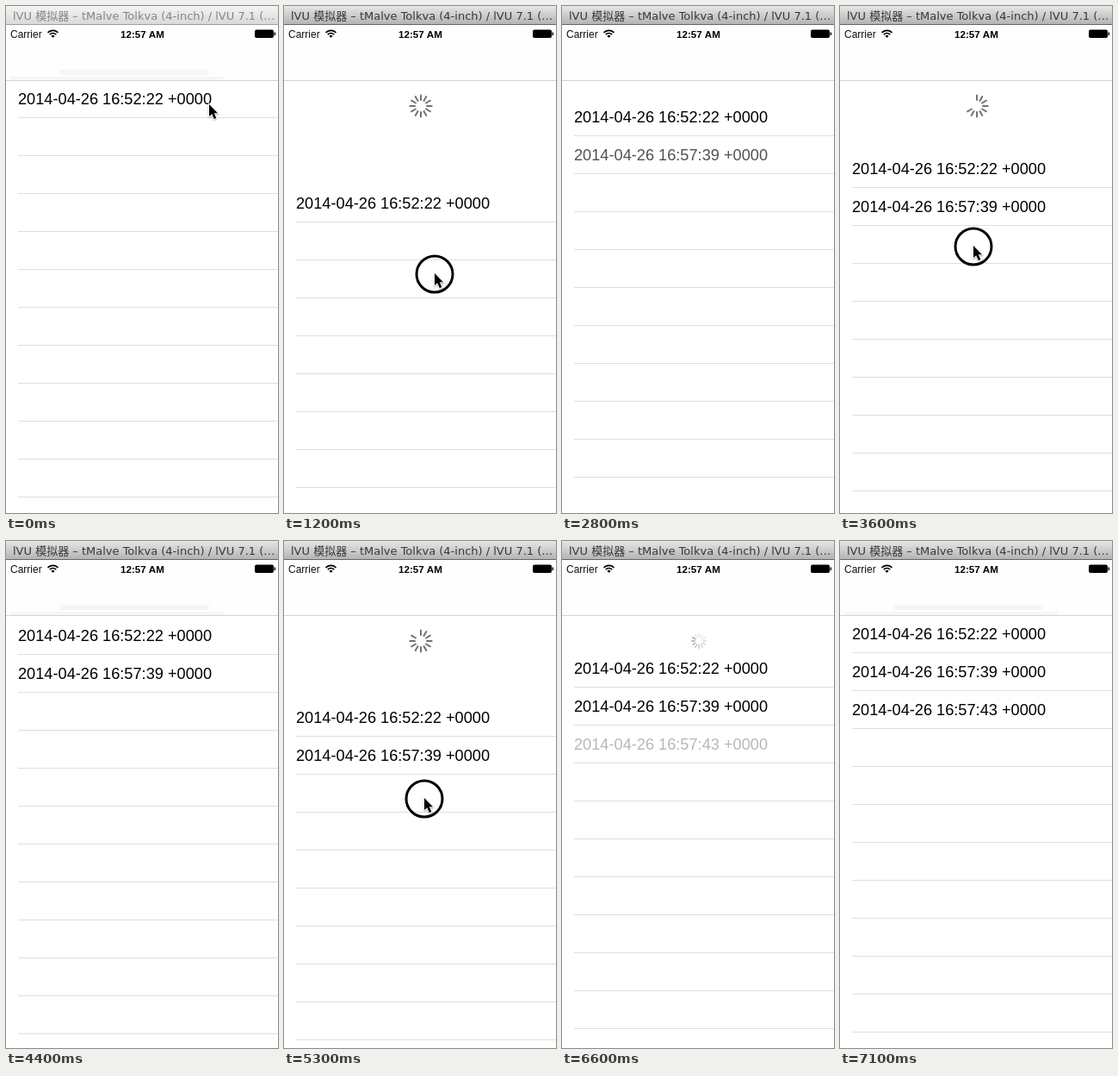
These frames come from a looping animation (316x588 px, 8000 ms). An HTML page with a canvas:

```html
<!DOCTYPE html>
<html lang="zh">
<head>
<meta charset="utf-8">
<title>Pull to refresh</title>
<style>
  html, body { margin: 0; width: 100%; height: 100%; overflow: hidden; background: #fff; }
  canvas { display: block; width: 316px; height: 588px; }
</style>
</head>
<body>
<canvas id="stage"></canvas>
<script>
const W = 316, H = 588, LOOP = 8000;
const NAV_BOTTOM = 86, ROW = 44, SETTLE = 570, REST = 60, DRAG_RATIO = 0.65;

const canvas = document.getElementById('stage');
const ctx = canvas.getContext('2d');
const dpr = window.devicePixelRatio || 1;
canvas.width = W * dpr;
canvas.height = H * dpr;
ctx.scale(dpr, dpr);

// Each pull: finger path as [time, offset], then a release; "done" ends a refresh.
const pulls = [
  { show: 0, path: [[600, 0], [1200, 121], [1500, 128]], done: 2630, from: [192, 125], toX: 175 },
  { show: 3300, path: [[3440, 0], [3600, 81], [3800, 92], [4000, 88]], from: [177, 154], toX: 155 },
  { show: 4650, path: [[4950, 0], [5400, 124], [5600, 130]], done: 6530, from: [172, 150], toX: 160 }
];
for (const p of pulls) {
  p.press = p.path[0][0];
  [p.release, p.peak] = p.path[p.path.length - 1];
}

const rows = [
  ['2014-04-26 16:52:22 +0000', 0],
  ['2014-04-26 16:57:39 +0000', pulls[0].done],
  ['2014-04-26 16:57:43 +0000', pulls[2].done]
];

const clamp = v => Math.max(0, Math.min(1, v));
const mix = (a, b, k) => a + (b - a) * k;
const easeOut = k => 1 - (1 - clamp(k)) ** 3;

function along(path, t) {
  for (let i = 1; i < path.length; i++) {
    const [t0, a] = path[i - 1], [t1, b] = path[i];
    if (t < t1) return mix(a, b, clamp((t - t0) / (t1 - t0)));
  }
  return path[path.length - 1][1];
}

function offsetOf(p, t) {
  if (t < p.release) return along(p.path, t);
  if (p.done && t >= p.done) return mix(REST, 0, easeOut((t - p.done) / SETTLE));
  return mix(p.peak, p.done ? REST : 0, easeOut((t - p.release) / SETTLE));
}

function rect(color, x, y, w, h) {
  ctx.fillStyle = color;
  ctx.fillRect(x, y, w, h);
}

function label(text, x, y, font, color) {
  ctx.font = font;
  ctx.fillStyle = color;
  ctx.fillText(text, x, y);
}

function drawSpinner(p, t, offset) {
  const refreshing = p.done && t >= p.release;
  const ending = p.done && t >= p.done;
  const count = refreshing ? 12 : Math.max(0, Math.min(12, Math.round((offset - 20) / 7)));
  const head = Math.floor(t / 985 * 12) + 2;
  const scale = ending ? offset / REST : 1;
  ctx.save();
  ctx.translate(159, 116);
  ctx.scale(scale, scale);
  ctx.lineWidth = 2;
  ctx.lineCap = 'round';
  ctx.strokeStyle = '#666';
  for (let i = 0; i < count; i++) {
    const age = (((head - i) % 12) + 12) % 12;
    const a = i * Math.PI / 6;
    ctx.globalAlpha = refreshing ? scale * Math.max(0.24, 0.95 - age * 0.085) : 0.92;
    ctx.beginPath();
    ctx.moveTo(Math.sin(a) * 7, -Math.cos(a) * 7);
    ctx.lineTo(Math.sin(a) * 12.6, -Math.cos(a) * 12.6);
    ctx.stroke();
  }
  ctx.restore();
}

function drawTable(t, offset) {
  const top = NAV_BOTTOM + offset;
  rect('#fff', 0, top, W, H - top);
  rows.forEach(([text, since], i) => {
    if (t < since) return;
    ctx.globalAlpha = since ? clamp((t - since) / 250) : 1;
    label(text, 14, top + 28 + i * ROW, '18.2px "Liberation Sans", Arial, sans-serif', '#000');
    ctx.globalAlpha = 1;
  });
  for (let y = top + 43; y < H; y += ROW) rect('#dedee0', 14, y, W - 14, 1);
}

function drawNavBar(offset) {
  rect('#fefefe', 0, 22, W, NAV_BOTTOM - 22);
  if (offset < 5) {
    rect('#f6f6f6', 62, 74, 174, 6);
    rect('#f6f6f6', 5, 82, 248, 4);
  }
  rect('#d3d3d3', 0, NAV_BOTTOM, W, 1);
}

function drawStatusBar() {
  label('Carrier', 5, 36.5, '12px "Liberation Sans", Arial, sans-serif', '#111');
  label('12:57 AM', 133, 36.5, 'bold 11.6px "Liberation Sans", Arial, sans-serif', '#000');

  ctx.strokeStyle = ctx.fillStyle = '#000';
  ctx.lineWidth = 1.7;
  for (const r of [5, 8.2]) {
    ctx.beginPath();
    ctx.arc(54.5, 36.5, r, -Math.PI * 0.76, -Math.PI * 0.24);
    ctx.stroke();
  }
  ctx.beginPath();
  ctx.moveTo(54.5, 36.8);
  ctx.arc(54.5, 36.8, 2.8, -Math.PI * 0.76, -Math.PI * 0.24);
  ctx.fill();

  ctx.beginPath();
  ctx.roundRect(289, 27.5, 22, 9.5, 2);
  ctx.fill();
  rect('#000', 311.6, 30.5, 1.4, 3.5);
}

function drawTitleBar(active) {
  const shade = ctx.createLinearGradient(0, 0, 0, 21);
  shade.addColorStop(0, active ? '#e6e6e6' : '#f4f4f4');
  shade.addColorStop(1, active ? '#b4b4b4' : '#d9d9d9');
  rect(shade, 0, 0, W, 21);
  rect(active ? '#686868' : '#a0a0a0', 0, 21, W, 1);
  label('lVU 模拟器 – tMalve Tolkva (4-inch) / lVU 7.1 (…', 8, 16,
    '13px "DejaVu Sans", "Noto Sans CJK SC", "Noto Sans CJK", sans-serif',
    active ? '#383838' : '#858585');
}

function drawPointer(p, t, offset) {
  if (t < p.show || t >= p.release + 50) return;
  const held = t >= p.press && t < p.release;
  const pull = t < p.release ? offset : p.peak;
  let x = mix(p.from[0], p.toX, clamp(pull / p.path[1][1]));
  let y = p.from[1] + pull / DRAG_RATIO;
  if (p === pulls[0] && t < 400) {
    x = mix(236, x, t / 400);
    y = mix(115, y, t / 400);
  }
  ctx.save();
  ctx.translate(Math.round(x), Math.round(y));
  if (held) {
    ctx.strokeStyle = '#000';
    ctx.lineWidth = 3;
    ctx.beginPath();
    ctx.arc(0, 0, 21, 0, Math.PI * 2);
    ctx.stroke();
  }
  const arrow = new Path2D('M0 -1V13L3.2 10.2L5.8 16L8.3 14.9L5.8 9.2H10Z');
  ctx.shadowColor = 'rgba(0,0,0,.35)';
  ctx.shadowBlur = 2 * dpr;
  ctx.shadowOffsetY = dpr;
  ctx.strokeStyle = '#fff';
  ctx.lineWidth = 1.6;
  ctx.stroke(arrow);
  ctx.shadowColor = 'transparent';
  ctx.fillStyle = '#000';
  ctx.fill(arrow);
  ctx.restore();
}

function draw(t) {
  const pull = pulls.filter(p => t >= p.show).pop();
  const offset = Math.round(offsetOf(pull, t));
  rect('#fff', 0, 0, W, H);
  if (offset > 0) drawSpinner(pull, t, offset);
  drawTable(t, offset);
  drawNavBar(offset);
  drawStatusBar();
  drawTitleBar(t >= 600);
  drawPointer(pull, t, offset);
}

const start = performance.now();
function frame() {
  draw((performance.now() - start) % LOOP);
  requestAnimationFrame(frame);
}
frame();
</script>
</body>
</html>
```
